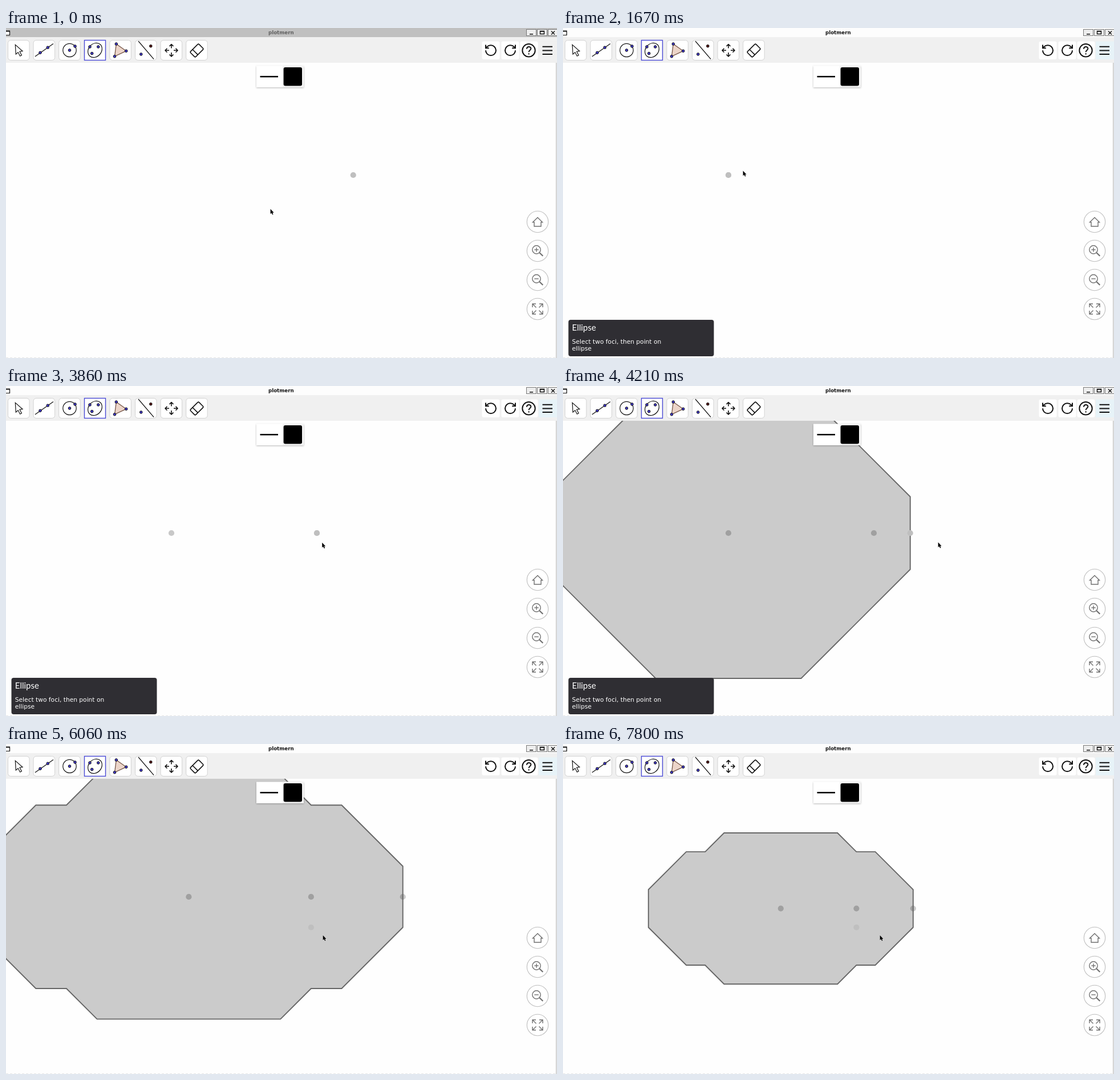
Write an HTML page that moves like this. It is 966 px wide and 579 px high and loops after 8.92 s.

```html
<!DOCTYPE html>
<html lang="en">
<head>
<meta charset="utf-8">
<title>plotmern</title>
<style>
  html, body { margin: 0; width: 100%; height: 100%; overflow: hidden; background: #fefefe; }
  svg { display: block; width: 966px; height: 579px; }
  text { font-family: "DejaVu Sans", sans-serif; }
  .bold { font-weight: bold; }
  .ink { fill: none; stroke: #111; stroke-width: 1.2; }
  .heavy { fill: none; stroke: #111; stroke-width: 1.6; stroke-linejoin: round; }
  .icon { fill: none; stroke: #111; stroke-width: 2; }
  .pt { fill: #4038c8; stroke: #111; stroke-width: 1; }
  .tool { fill: #fff; stroke: #d2d2d2; }
  .nav { fill: none; stroke: #707070; stroke-width: 1.4; }
  .ring { fill: #fff; stroke: #bdbdbd; stroke-width: 1.1; }
</style>
</head>
<body>
<svg viewBox="0 0 966 579">
  <defs>
    <filter id="shadow" x="-20%" y="-20%" width="140%" height="150%">
      <feDropShadow dx="0" dy="1" stdDeviation="1.5" flood-opacity=".28"/>
    </filter>
    <path id="curl" d="M-9 0A9 9 0 1 0 0-9 9.75 9.75 0 0 0-6.7-6.3L-9-4M-9-9.8V-4H-3.2" class="icon"/>
    <circle id="dot" r="2.3"/>
    <g id="oval">
      <ellipse rx="13.7" ry="11.2" transform="rotate(-48)" class="ink"/>
      <use href="#dot" x="-9" y="-6"/><use href="#dot" x="5.8" y="-6"/><use href="#dot" x="-5.3" y="5.6"/>
    </g>
  </defs>

  <rect width="966" height="579" fill="#fefefe"/>
  <g id="points" fill="#c8c8c8"></g>
  <polygon id="shape" fill="#000" fill-opacity=".2" stroke="#666" stroke-width="1.9"/>
  <circle id="snap" r="5.1" fill="#bfbfbf"/>

  <path d="M964.8 61V579" stroke="#aaa"/>
  <path d="M0 578.5H966" stroke="#e6e6e6" stroke-dasharray="4 3"/>

  <rect id="bar" width="966" height="17"/>
  <rect y="16" width="966" height="45" fill="#f0f0f0"/>
  <text id="caption" class="bold" x="482.3" y="11" font-size="8.67" text-anchor="middle">plotmern</text>
  <path d="M-1 5H6.5V12.5H-1M-1 6H6" fill="#fff" stroke="#111" stroke-width="1.2"/>
  <g fill="#eee" stroke="#777">
    <rect x="912.5" y="2.5" width="17" height="11"/>
    <rect x="931.5" y="2.5" width="17" height="11"/>
    <rect x="950.5" y="2.5" width="17" height="11"/>
  </g>
  <path d="M918 10.8H924M936 6H944M936.5 5.5H943.5V10.5H936.5ZM956 5.5 962 11.5M962 5.5 956 11.5" fill="none" stroke="#111" stroke-width="1.4"/>

  <g id="tools"></g>
  <rect id="selected" x="137.5" y="21.5" width="37" height="35" stroke="#4b4bd6" stroke-width="1.4"/>
  <path d="M16.3 29.3 17.3 46 21.2 42.6 24.6 49.2 27.4 47.8 24 41.2 29 40.6Z" class="ink"/>
  <path d="M51 50 83 27.5" class="ink"/>
  <circle cx="111.5" cy="39" r="11.7" class="ink"/>
  <use href="#oval" x="156" y="39" class="pt"/>
  <path d="M193.3 28 210.7 40.3 190.5 49.8Z" fill="#ecd5c9" stroke="#6b4a3c" stroke-width="1.2"/>
  <path d="M232 23 259 54.5" class="ink"/>
  <g class="pt">
    <use href="#dot" x="60" y="43.3"/><use href="#dot" x="73.3" y="34.2"/>
    <use href="#dot" x="111.5" y="39"/><use href="#dot" x="121" y="32"/>
    <use href="#dot" x="193.3" y="28"/><use href="#dot" x="210.7" y="40.3"/>
    <use href="#dot" x="190.5" y="49.8"/><use href="#dot" x="236.8" y="46"/>
  </g>
  <use href="#dot" x="253.8" y="31.7" fill="#521010" stroke="#111"/>
  <path d="M290 28.5V35.5M290 43V50M279 39.2H286M294 39.2H301M286.5 32 290 28.5 293.5 32M286.5 46.5 290 50 293.5 46.5M282.5 35.7 279 39.2 282.5 42.7M297.5 35.7 301 39.2 297.5 42.7" class="heavy"/>
  <g transform="translate(334.5 39.5) rotate(-45)" class="heavy">
    <rect x="-10.5" y="-6.5" width="21" height="13" rx="2"/><path d="M-4-6.5V6.5"/>
  </g>

  <g fill="#fff">
    <rect x="834.5" y="23.5" width="31" height="31.5" rx="3"/>
    <rect x="868.5" y="23.5" width="31" height="31.5" rx="3"/>
    <rect x="901.5" y="23.5" width="31" height="31.5" rx="3"/>
  </g>
  <rect id="menu" x="934" y="23.5" width="32" height="31.5"/>
  <use href="#curl" x="850" y="39.3"/>
  <use href="#curl" transform="translate(884 39.3) scale(-1 1)"/>
  <circle cx="916.5" cy="39.3" r="11.2" class="icon"/>
  <path d="M913 36.8C913 31.7 920.5 31.8 920.3 36.4 920 39 916.6 39 916.6 42.2M916.6 44.3V46.5" class="icon"/>
  <path d="M940.5 32.8H958M940.5 39.4H958M940.5 46H958" class="icon"/>

  <rect x="439" y="66.5" width="83" height="37.5" fill="#fff" filter="url(#shadow)"/>
  <rect x="485" y="66.5" width="37" height="37.5" fill="#f3f3f3"/>
  <path d="M445.5 85.3H477" stroke="#000" stroke-width="2.5"/>
  <rect x="486.6" y="69" width="32.4" height="32.4" rx="3"/>

  <g id="rings"></g>
  <path d="M923.5 340.8 932 332.5 940.5 340.8H938V348H926V340.8Z" class="nav"/>
  <g id="lens" class="nav">
    <circle cx="930" cy="389" r="7.2"/><path d="M935.3 394.3 941.3 400" stroke-width="2.2"/>
    <path d="M926.3 389H933.7"/>
  </g>
  <path d="M930 385.3V392.7" class="nav"/>
  <use href="#lens" y="51"/>
  <path d="M923 490V484H929M923 484 929.5 490.5M935 484H941V490M941 484 934.5 490.5M923 496V502H929M923 502 929.5 495.5M935 502H941V496M941 502 934.5 495.5" class="nav"/>

  <g id="popup">
    <rect x="137.5" y="57.5" width="94" height="42" fill="#fff" stroke="#b8b8b8"/>
    <use href="#oval" x="158.5" y="78.3" fill="#1a1a9c"/>
    <text class="bold" x="179.8" y="82" font-size="9.33">Ellipse</text>
  </g>
  <g id="tip" fill="#fff">
    <rect x="9.5" y="512" width="255" height="64" rx="4" fill="#2f2e33"/>
    <text x="15.8" y="530.5" font-size="15" style="font-family:Lato,sans-serif">Ellipse</text>
    <g font-size="10.67">
      <text x="15.8" y="553.5">Select two foci, then point on</text>
      <text x="15.8" y="566.3">ellipse</text>
    </g>
  </g>
  <circle id="halo" cx="156.5" cy="40" r="11" fill="#e8e83c" fill-opacity=".7"/>
  <path id="cursor" d="M-.4-.5V8.2L1.6 6.5 3 9.6 4.5 9 3.2 6H5.6Z" stroke="#fff" stroke-width=".9" paint-order="stroke"/>
</svg>

<script>
const LOOP = 8920;
const SPACING = 63.75;
const CENTER = { x: 481.25, y: 321.75, col: 3, row: 1 };
const CANVAS_TOP = 61;
const SNAP_LAG = 70;
const ZOOM_RATIO = 0.9083;
const CLICKS = { tool: 720, canvas: 1600, focus: 3420, rim: 4790 };

const $ = id => document.getElementById(id);
const set = (el, attrs) => Object.entries(attrs).forEach(([k, v]) => el.setAttribute(k, v));
const show = (id, on) => $(id).style.display = on ? "" : "none";
const clamp = v => Math.max(0, Math.min(1, v));
const ease = p => p * p * (3 - 2 * p);

$("tools").innerHTML = Array.from({ length: 8 }, (_, i) =>
  `<rect class="tool" x="${3.5 + 44.6 * i}" y="21.5" width="37.5" height="35" rx="5"/>`).join("");
$("rings").innerHTML = [0, 1, 2, 3].map(i =>
  `<circle class="ring" cx="932" cy="${340 + 51 * i}" r="18.7"/>`).join("");

// Each stroke of the pointer bends towards `via` and starts where the last one ended.
const HOME = [464, 318];
const strokes = [
  { start: 70, end: 720, via: [-30, 155], to: [158, 39] },
  { start: 990, end: 1400, via: [260, 270], to: [316, 251] },
  { start: 1920, end: 2800, via: [430, 305], to: [514, 270] },
  { start: 2870, end: 3420, via: [525, 268], to: [532, 267] },
  { start: 3670, end: 4530, via: [613, 304], to: [733, 248] },
  { start: 4600, end: 4790, via: [735, 248], to: [736, 248] },
  { start: 4990, end: 5850, via: [633, 283], to: [556, 336] }
];
strokes.forEach((s, i) => s.from = i ? strokes[i - 1].to : HOME);
const strokeAt = t => strokes.findLast(s => s.start <= t);

function pointer(t) {
  const s = strokeAt(t);
  if (!s) return HOME;
  const last = Math.round((s.end - s.start) / 70);
  const step = Math.floor((t - s.start) / (s.end - s.start) * last + 1e-6);
  const p = ease(clamp((step + 1) / (last + 1))), q = 1 - p;
  return [0, 1].map(k => q * q * s.from[k] + 2 * p * q * s.via[k] + p * p * s.to[k]);
}

// A wheel notch settles in a few picture steps.
const notch = (t, start, steps) => ease(clamp((Math.floor((t - start) / 65) + 1) / steps));

function spacing(t) {
  let turns = 0.8 * notch(t, 5530, 2);
  for (let i = 0; i < 6; i++) turns += notch(t, 5990 + 333 * i, i < 3 ? 2 : 3);
  return SPACING * ZOOM_RATIO ** turns;
}

// Grid point nearest to where the pointer last moved over the canvas.
function snapped(t) {
  t -= SNAP_LAG;
  const s = strokeAt(t);
  if (!s) return [5, 0];
  t = Math.min(t, s.end);
  while (pointer(t)[1] < CANVAS_TOP) t -= 65;
  const [x, y] = pointer(t), unit = spacing(t);
  return [CENTER.col + Math.round((x - CENTER.x) / unit), CENTER.row + Math.round((y - CENTER.y) / unit)];
}

function outline(col) {
  const quadrant = [[col, 1], [col - 2, 3], [Math.min(col - 2, 4), 3], [Math.min(col - 3, 3), 4]];
  const turn = (sx, sy) => quadrant.map(([x, y]) => [sx * x, sy * y]);
  return [...turn(1, 1), ...turn(-1, 1).reverse(), ...turn(-1, -1), ...turn(1, -1).reverse()];
}

function draw(t) {
  const unit = spacing(t);
  const place = ([col, row]) =>
    [CENTER.x + (col - CENTER.col) * unit, CENTER.y + (row - CENTER.row) * unit];

  const snap = snapped(t);
  const [cx, cy] = place(snap);
  set($("snap"), { cx, cy });

  const cols = [[CLICKS.canvas, 0], [CLICKS.focus, 4], [CLICKS.rim, 7]]
    .filter(([time]) => t >= time).map(([, col]) => col);
  $("points").innerHTML = cols.map(col => {
    const [x, y] = place([col, 0]);
    return `<circle cx="${x}" cy="${y}" r="5.1"/>`;
  }).join("");

  const rim = t < CLICKS.rim ? snap[0] : 7;
  const closed = t >= CLICKS.focus && rim > 4;
  show("shape", closed);
  if (closed) set($("shape"), { points: outline(rim).map(place).join(" ") });

  const active = t >= 70;
  const open = t >= CLICKS.tool && t < CLICKS.canvas;
  set($("bar"), { fill: active ? "#fdfdfd" : "#c0c0c0" });
  set($("caption"), { fill: active ? "#111" : "#606060" });
  set($("menu"), { fill: active ? "#e7f3f8" : "#f0f0f0" });
  set($("selected"), { fill: open ? "#d6edfc" : "#fff" });
  show("popup", open);
  show("tip", t >= CLICKS.tool && t < 5780);
  show("halo", t >= CLICKS.tool && t < 900);
  set($("cursor"), { transform: `translate(${pointer(t)})` });
}

function tick(now) {
  draw(now % LOOP);
  requestAnimationFrame(tick);
}
draw(0);
requestAnimationFrame(tick);
</script>
</body>
</html>
```
